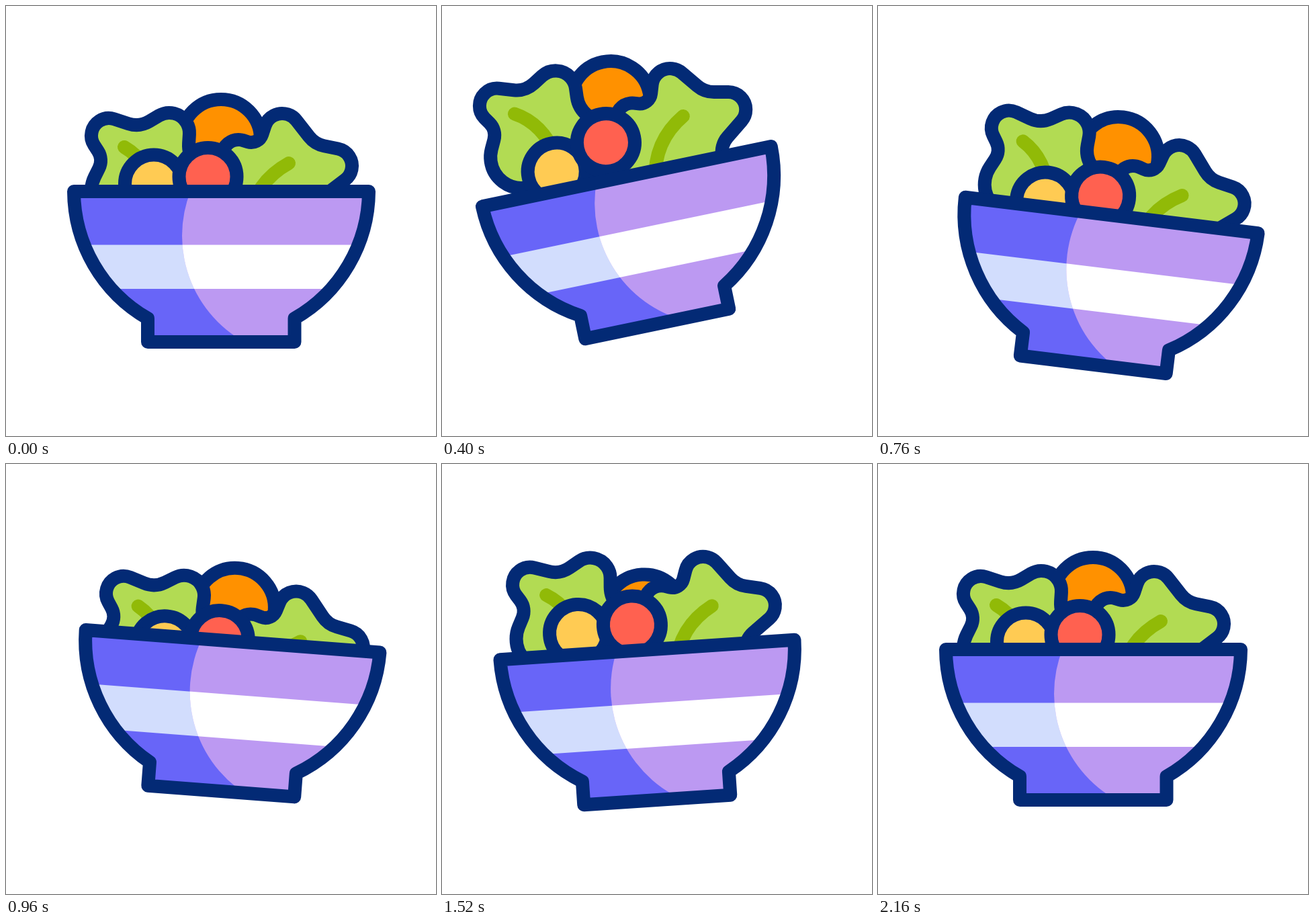
Write an HTML page with a canvas that moves like this. It is 640 px wide and 640 px high and loops after 2440 ms.

```html
<!DOCTYPE html>
<html lang="en">
<head>
<meta charset="utf-8">
<title>Salad toss</title>
<style>
html, body { margin: 0; width: 100%; height: 100%; overflow: hidden; background: #fff; }
canvas { display: block; width: 640px; height: 640px; }
</style>
</head>
<body>
<canvas id="stage" width="640" height="640"></canvas>
<script>
const ctx = document.getElementById('stage').getContext('2d');
const LOOP = 2440, STEP = 40, END = 2160;
const NAVY = '#032a75', GREEN = '#b2db53', VEIN = '#91ba07';

// Sine-eased swing between the values at the given times.
function swing(times, values, t) {
  const i = times.findIndex(time => t < time);
  if (i < 0) return values[values.length - 1];
  if (i === 0) return values[0];
  const k = (t - times[i - 1]) / (times[i] - times[i - 1]);
  return values[i - 1] + (values[i] - values[i - 1]) * (1 - Math.cos(Math.PI * k)) / 2;
}

const bowlTurn = t => swing([0, 440, 820, 1280, 1700], [0, -12, 8.2, -9.9, 0], t);
const bowlLift = t => swing([0, 310, 705, 1010, 1280], [0, -36, 38, -16.5, 0], t);
const foodLift = (f, t) => swing([f.start, 540, 940, 1430, 1800, END], [0, ...f.swing, 0], t);

// Outline wrapped around circles: positive radii bulge out, negative ones dent in.
function wrap(circles) {
  const path = new Path2D(), n = circles.length;
  const normals = circles.map(([x, y, r], i) => {
    const [x2, y2, r2] = circles[(i + 1) % n];
    const dx = x2 - x, dy = y2 - y;
    return Math.atan2(dy, dx) - Math.acos((r - r2) / Math.hypot(dx, dy));
  });
  circles.forEach(([x, y, r], i) => {
    const flip = r < 0 ? Math.PI : 0;
    path.arc(x, y, Math.abs(r), normals[(i + n - 1) % n] + flip, normals[i] + flip, r < 0);
  });
  path.closePath();
  return path;
}

function disc(x, y, r) {
  const path = new Path2D();
  path.arc(x, y, r, 0, Math.PI * 2);
  return path;
}

const leafLeft = wrap([
  [153, 193, 26], [194, 139, -38], [243, 189, 30], [314, 207, -42],
  [318, 290, 40], [173, 275, 46], [115, 230, -26]
]);
const leafRight = wrap([
  [411, 187, 27], [481, 171, -38], [489, 238, 26], [500, 305, -34],
  [430, 325, 36], [355, 300, 40], [346, 223, 24], [365, 186, -17]
]);

// Back to front.
const foods = [
  { path: disc(320, 198, 59), color: '#ff9100', start: 220, swing: [-62, 28, 26, 17.5] },
  { path: leafLeft, color: GREEN, vein: new Path2D('M176 210Q214 232 224 285'),
    start: 220, swing: [-99, 25, -30, 4] },
  { path: leafRight, color: GREEN, vein: new Path2D('M421 234Q370 262 361 320'),
    start: 220, swing: [-48, 35, -21, 10] },
  { path: disc(220, 264.5, 43), color: '#ffcb53', start: 220, swing: [-28, 25, -23, 0] },
  { path: disc(300.5, 254, 43), color: '#ff6150', start: 0, swing: [-40, 21, -19, 0] }
];
const bowl = new Path2D('M101 276H540A219.5 219.5 0 0 1 429.5 465V500H211V465A219.5 219.5 0 0 1 101 276Z');
const shine = disc(443, 342, 181);

function line(path, color) {
  ctx.strokeStyle = color;
  ctx.stroke(path);
}

function drawFood(food, t) {
  ctx.save();
  ctx.translate(0, foodLift(food, t));
  ctx.fillStyle = food.color;
  ctx.fill(food.path);
  if (food.vein) line(food.vein, VEIN);
  line(food.path, NAVY);
  ctx.restore();
}

function bands(base, stripe) {
  ctx.fillStyle = base;
  ctx.fillRect(80, 260, 480, 260);
  ctx.fillStyle = stripe;
  ctx.fillRect(80, 355.5, 480, 65.5);
}

function drawBowl() {
  ctx.save();
  ctx.clip(bowl);
  bands('#6865f8', '#d2ddfd');
  ctx.clip(shine);
  bands('#bc99f2', '#ffffff');
  ctx.restore();
  line(bowl, NAVY);
}

function draw(t) {
  ctx.setTransform(1, 0, 0, 1, 0, 0);
  ctx.fillStyle = '#fff';
  ctx.fillRect(0, 0, 640, 640);
  ctx.lineWidth = 20;
  ctx.lineJoin = ctx.lineCap = 'round';
  ctx.translate(320, 500 + bowlLift(t));
  ctx.rotate(bowlTurn(t) * Math.PI / 180);
  ctx.translate(-320, -500);
  foods.forEach(food => drawFood(food, t));
  drawBowl();
}

const start = performance.now();
function tick() {
  const t = (performance.now() - start) % LOOP;
  draw(Math.min(END, Math.floor(t / STEP) * STEP));
  requestAnimationFrame(tick);
}
tick();
</script>
</body>
</html>
```
